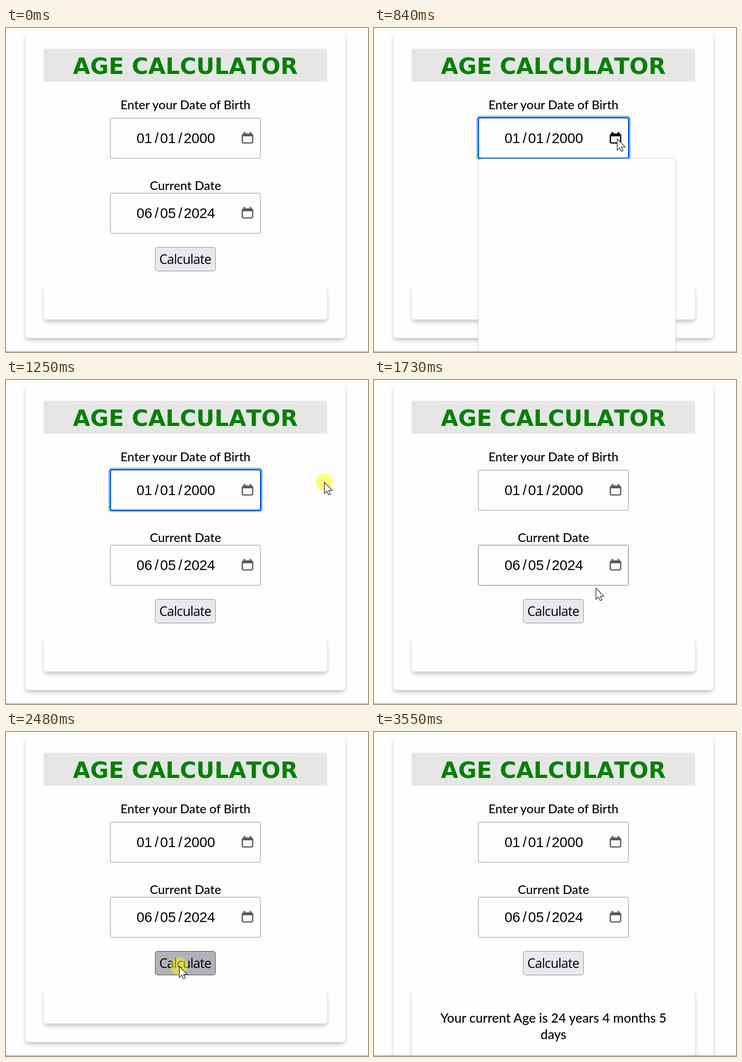
Write an HTML page that moves like this. It is 751 px wide and 670 px high and loops after 4.5 s.

```html
<!DOCTYPE html>
<html lang="en">
<head>
<meta charset="utf-8">
<title>Age calculator</title>
<style>
html, body { margin: 0; width: 100%; height: 100%; overflow: hidden; background: #fefefe; }
svg { display: block; width: 751px; height: 670px; }
text { text-anchor: middle; white-space: pre; }
.title { font: bold 46.5px "DejaVu Sans", sans-serif; font-kerning: none; fill: #008000; }
.label { font: 500 25.7px Lato, sans-serif; }
.result { font: 500 26.8px Lato, sans-serif; }
.date { font: 29.33px "Liberation Sans", Arial, sans-serif; text-anchor: start; }
.button { font: 27px "Open Sans", sans-serif; letter-spacing: -.8px; }
.panel { fill: #fefefe; filter: url(#shadow); }
</style>
</head>
<body>
<svg viewBox="0 0 751 670" xmlns="http://www.w3.org/2000/svg">
  <defs>
    <filter id="shadow" x="-10%" y="-30%" width="120%" height="160%">
      <feDropShadow dx="0" dy="5" stdDeviation="4.5" flood-color="#000" flood-opacity=".22"/>
    </filter>
    <filter id="glow" x="-5%" y="-5%" width="110%" height="110%">
      <feDropShadow dx="0" dy="0" stdDeviation="2" flood-color="#202040" flood-opacity=".18"/>
    </filter>
    <g id="calendar">
      <rect x="1.3" y="4.3" width="21.4" height="18.4" rx="3" fill="none" stroke="currentColor" stroke-width="2.6"/>
      <path d="M2 4h20v5H2zM4 0h3.5v5H4zM16.5 0H20v5h-3.5z" fill="currentColor"/>
    </g>
  </defs>
  <rect width="751" height="670" fill="#fefefe"/>
  <rect id="card" class="panel" x="40" y="11" width="664" rx="7"/>
  <rect x="78" y="43" width="588" height="68" fill="#e6e6e6"/>
  <text class="title" x="372" y="94.5">AGE CALCULATOR</text>
  <text class="label" x="372.3" y="168">Enter your Date of Birth</text>
  <text class="label" x="372.3" y="335">Current Date</text>
  <g id="fields"></g>
  <rect id="button" x="309.5" y="453.5" width="125" height="49" rx="5"/>
  <text class="button" x="371.7" y="488">Calculate</text>
  <rect id="box" class="panel" x="78" y="533" width="588" rx="7"/>
  <g id="result" class="result">
    <text x="372.3" y="601">Your current Age is 24 years 4 months 5</text>
    <text x="372.3" y="635">days</text>
  </g>
  <g id="focus" fill="none" stroke-width="3">
    <rect x="213.5" y="182.5" width="318" height="89" rx="5.5" stroke="#b0c8f1"/>
    <rect x="216.5" y="185.5" width="312" height="84" rx="3" stroke="#0060df"/>
  </g>
  <rect id="popup" x="216.5" y="270.5" width="409" height="440" rx="8" fill="#fefefe" stroke="#ececf0" filter="url(#glow)"/>
  <rect y="668" width="751" height="2" fill="#c6c6c9"/>
  <g id="pointer">
    <circle id="click" r="18" fill="#ff0" fill-opacity=".5"/>
    <path d="M.5.5V23.6L5.6 18.6 9.2 26.4 12.8 24.8 9.3 17.2H16.8Z" fill="#fff" stroke="#000" stroke-width="1.1"/>
  </g>
</svg>
<script>
const LOOP = 4500, STEP = 60;
const $ = id => document.getElementById(id);
const set = (el, attrs) => { for (const k in attrs) el.setAttribute(k, attrs[k]); };
const show = (id, on) => set($(id), { visibility: on ? "visible" : "hidden" });
const within = (t, a, b) => t >= a && t < b;
const clamp = v => Math.max(0, Math.min(1, v));
const easeOut = k => 1 - (1 - k) ** 2;
const mix = (a, b, k) => a.map((v, i) => v + (b[i] - v) * k);

function field(id, y, date) {
  const label = (s, x) => `<text class="date" x="${x}" y="${y + 52}">${s}</text>`;
  const parts = date.split("/").map((s, i) => label(s, 270.7 + 49 * i));
  const slashes = [0, 1].map(i => label("/", 308.5 + 49 * i));
  return `<rect id="${id}" x="216.5" y="${y + .5}" width="311" height="83" rx="2" fill="#fefefe"/>
    ${parts.join("")}${slashes.join("")}
    <use id="${id}Icon" href="#calendar" x="489" y="${y + 29}" color="#5b5b5b"/>`;
}
$("fields").innerHTML = field("birth", 186, "01/01/2000") + field("today", 341, "06/05/2024");

// Places the pointer visits
const entry = [657, 615], icon = [504, 229], aside = [660, 211], below = [417, 437],
  press = [359, 484], left = [93, 548], exit = [574, 664];

// Each stroke eases along a curve; bend is its control point.
const strokes = [
  { start: 60, end: 310, from: entry, to: icon },
  { start: 1130, end: 1130, from: aside, to: aside },
  { start: 1490, end: 1980, from: aside, to: below, bend: [486, 458] },
  { start: 2020, end: 2250, from: below, to: press },
  { start: 2840, end: 3140, from: press, to: left },
  { start: 3140, end: 3550, from: left, to: exit }
];

function pointerAt(t) {
  const { start, end, from, to, bend = mix(from, to, .5) } = strokes.findLast(s => s.start <= t);
  const elapsed = Math.floor((t - start) / STEP) * STEP;
  const k = t >= end ? 1 : easeOut(elapsed / (end - start));
  return mix(mix(from, bend, k), mix(bend, to, k), k).map(Math.round);
}

const border = hover => hover ? "#676774" : "#8f8f9d";

function draw(t) {
  const done = t >= 2730;
  const pressed = within(t, 2480, 2730);
  const overButton = within(t, 2080, 2900);

  set($("card"), { height: done ? 698 : 630 });
  set($("box"), { height: done ? 138 : 70 });
  show("result", done);

  set($("birth"), { stroke: border(within(t, 250, 1130)) });
  set($("birthIcon"), { color: within(t, 310, 1130) ? "#000" : "#5b5b5b" });
  set($("today"), { stroke: border(within(t, 1610, 1780)) });
  set($("button"), {
    fill: pressed ? "#b1b1b9" : overButton ? "#d0d0d7" : "#e9e9ed",
    stroke: pressed ? "#484851" : border(overButton)
  });

  show("focus", within(t, 680, 1310));
  show("popup", within(t, 680, 1250));
  set($("popup"), { opacity: clamp((t - 640) / 200) });

  const visible = within(t, 60, 3550);
  show("pointer", visible);
  show("click", within(t, 540, 760) || within(t, 1250, 1490) || pressed);
  if (visible) set($("pointer"), { transform: `translate(${pointerAt(t)})` });
}

const start = performance.now();
function frame() {
  draw((performance.now() - start) % LOOP);
  requestAnimationFrame(frame);
}
frame();
</script>
</body>
</html>
```
